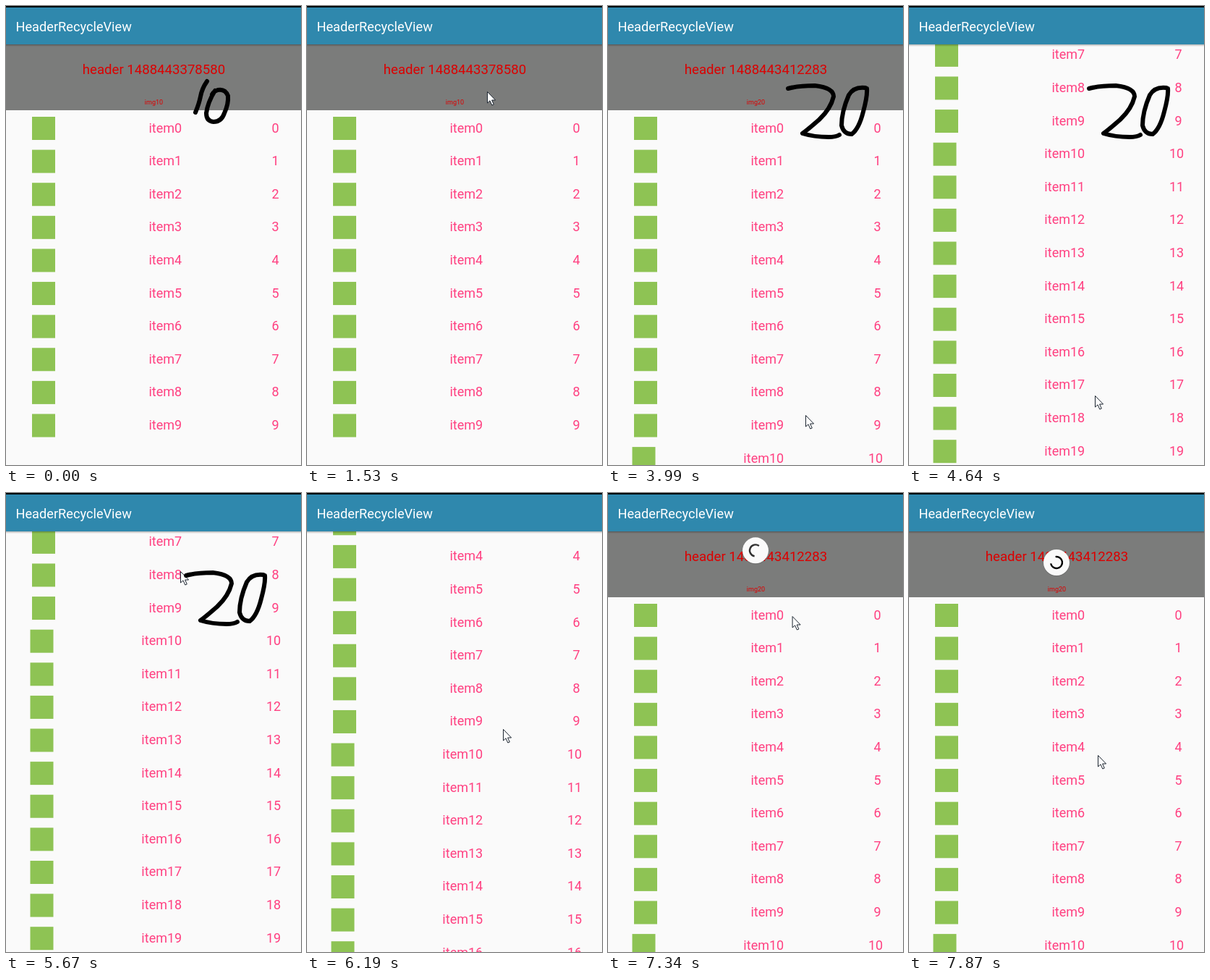
Recreate the animation shown at these times as an HTML page. Size 408 px wide and 634 px high, loop 8 s.

```html
<!DOCTYPE html>
<html lang="en">
<head>
<meta charset="utf-8">
<title>HeaderRecycleView</title>
<style>
  html, body { margin: 0; width: 100%; height: 100%; overflow: hidden; background: #fafafa; }
  svg { display: block; width: 408px; height: 634px; font: 18px Roboto, sans-serif; }
  .pen { fill: none; stroke: #000; stroke-width: 6; stroke-linecap: round; stroke-linejoin: round; }
  .row { fill: #ff4081; }
  .head { fill: #dc0000; text-anchor: middle; }
</style>
</head>
<body>
<svg viewBox="0 0 408 634">
  <defs>
    <linearGradient id="shade" x2="0" y2="1">
      <stop stop-opacity=".28"/><stop offset="1" stop-opacity="0"/>
    </linearGradient>
  </defs>
  <rect width="408" height="634" fill="#fafafa"/>
  <g id="list">
    <rect y="53" width="408" height="91" fill="#7b7c7b"/>
    <text id="stamp" class="head" x="204.5" y="94" font-size="18.6"></text>
    <text id="image" class="head" x="204.5" y="136" font-size="9"></text>
  </g>
  <g id="spinner">
    <circle cy=".7" r="18.4" opacity=".12"/>
    <circle r="18" fill="#fafafa"/>
    <path id="arc" fill="none" stroke="#000" stroke-width="2.4"/>
  </g>
  <rect y="53" width="408" height="3" fill="url(#shade)"/>
  <rect width="408" height="53" fill="#2f88ad"/>
  <rect width="408" height="2" fill="#000"/>
  <text x="13.5" y="35" font-size="18.2" fill="#fff">HeaderRecycleView</text>
  <path id="cursor" d="M.5 .5V16L4 12.8 6.8 19 9.3 18 6.6 12H11.6Z" fill="#fff" stroke="#1c2530"/>
  <path id="ten" class="pen" d="M278 104Q271 114 269 125Q267 135 262 147M289 117Q279 133 277 148Q277 159 287 160Q298 160 302 148Q308 135 307 124Q303 114 293 116Q287 118 285 122"/>
  <path id="twenty" class="pen" d="M249 114Q264 110 286 110Q312 113 312 125Q308 142 292 157Q276 171 269 176Q285 181 305 181Q315 181 320 178M356 113Q340 111 333 123Q323 146 323 165Q326 177 337 177Q347 170 353 146Q359 124 358 114"/>
</svg>
<script>
const $ = id => document.getElementById(id);
const LOOP = 8000, TICK = 129.2, LAST = 61;
const ROW = 45.61, MAX_SCROLL = 420.4, LOADED = 25;
const HIDDEN_TOP = 17, REST_TOP = 78;
const PULLS = [{ start: 13, release: 23, end: 26 }, { start: 56, release: 61, end: 62 }];

// Turning points of the pointer: tick, x, y.
const pointerPath = [
  [1, 361, 87], [2, 290, 594], [4, 211, 414], [6, 211, 414], [8, 251, 129],
  [11, 349, 87], [12, 249, 118], [13, 249, 118], [18, 255, 172], [22, 267, 295],
  [27, 270, 316], [31, 273, 565], [33, 272, 292], [36, 257, 538], [42, 255, 178],
  [44, 241, 108], [46, 248, 150], [48, 271, 326], [50, 278, 358], [54, 253, 128],
  [56, 253, 122], [61, 261, 362]
];

const clamp = u => Math.max(0, Math.min(1, u));
const glide = (tick, from, to) => clamp((tick - from) / (to - from)) ** 1.93;

function pointer(tick) {
  const i = Math.max(1, pointerPath.findIndex(p => p[0] >= tick));
  const [t0, x0, y0] = pointerPath[i - 1], [t1, x1, y1] = pointerPath[i];
  const u = clamp((tick - t0) / (t1 - t0));
  return { x: x0 + (x1 - x0) * u, y: y0 + (y1 - y0) * u };
}

// The spinner follows the drag with growing resistance, then rests until loading ends.
function spinnerTop(tick, pull) {
  if (tick >= pull.release) return REST_TOP;
  const drag = pointer(tick).y - pointer(pull.start).y;
  return HIDDEN_TOP + 130 * (1 - Math.exp(-drag / 115));
}

function arcPath(start, sweep) {
  const point = deg => {
    const r = deg * Math.PI / 180;
    return `${8 * Math.cos(r)} ${8 * Math.sin(r)}`;
  };
  return `M${point(start)}A8 8 0 ${sweep > 180 ? 1 : 0} 1 ${point(start + sweep)}`;
}

function rowMarkup(i) {
  const shift = i > 9 ? -2.5 : 0, y = 168 + i * ROW;
  return `<rect x="${36 + shift}" y="${y - 15}" width="32" height="32" fill="#8ec354"/>
    <text x="243.2" y="${y + 6.5}" text-anchor="end">item${i}</text>
    <text x="${372.5 + shift}" y="${y + 6.5}" text-anchor="middle">${i}</text>`;
}

const rows = Array.from({ length: 20 }, (_, i) => {
  const g = document.createElementNS("http://www.w3.org/2000/svg", "g");
  g.setAttribute("class", "row");
  g.innerHTML = rowMarkup(i);
  $("list").append(g);
  return g;
});

const move = (id, x, y, scale = 1) =>
  $(id).setAttribute("transform", `translate(${x} ${y}) scale(${scale})`);
const show = (el, on) => { el.style.display = on ? "" : "none"; };

function drawSpinner(tick) {
  const pull = PULLS.find(p => tick > p.start && tick < p.end);
  show($("spinner"), pull);
  if (!pull) return;
  const top = spinnerTop(tick, pull);
  const progress = clamp((top - HIDDEN_TOP) / (REST_TOP - HIDDEN_TOP));
  const scale = tick < LOADED || tick > pull.end - 1 ? 1 : clamp((pull.end - tick) / 2);
  move("spinner", 204, top + 18, pull === PULLS[0] ? scale : 1);
  $("arc").setAttribute("d", arcPath(-100 + (tick - LAST) * 40, 40 + 230 * progress));
  $("arc").setAttribute("opacity", 0.3 + 0.7 * progress);
}

function draw(now) {
  const tick = Math.min(LAST, Math.floor((now % LOOP + 28) / TICK));
  const loaded = tick >= LOADED;

  $("stamp").textContent = "header " + (loaded ? 1488443412283 : 1488443378580);
  $("image").textContent = loaded ? "img20" : "img10";
  rows.forEach((row, i) => show(row, i < 10 || loaded));
  move("list", 0, MAX_SCROLL * (glide(tick, 45, 50) - glide(tick, 31, 33)));
  drawSpinner(tick);

  const { x, y } = pointer(tick);
  move("cursor", x, y);
  show($("cursor"), tick >= 1);
  show($("ten"), tick < 1);
  show($("twenty"), tick >= 31 && tick < 46);
  requestAnimationFrame(() => draw(performance.now()));
}
draw(0);
</script>
</body>
</html>
```
